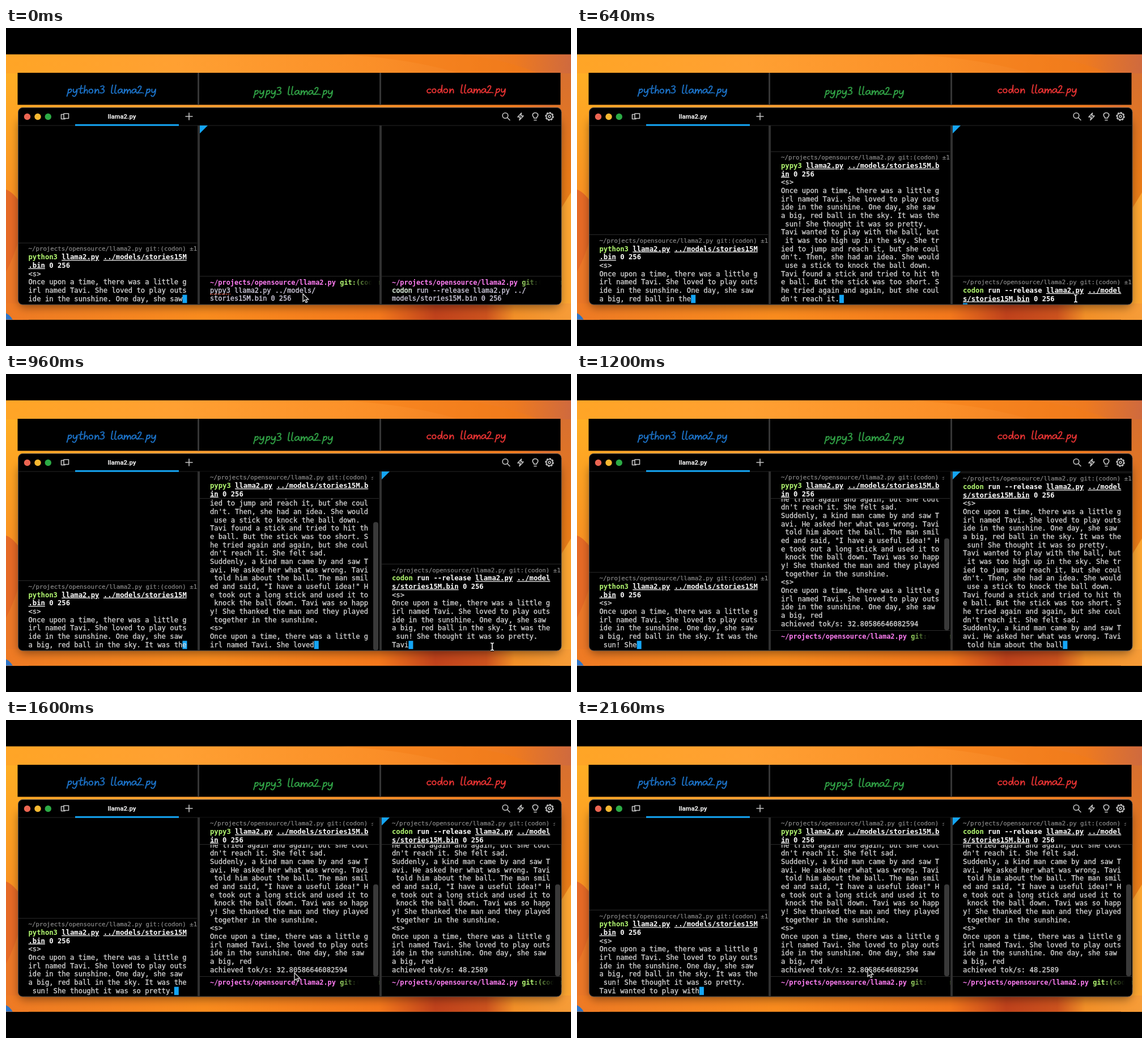
Animation of 997 by 561 pixels, one loop 2240 ms. Source, as an HTML page:

```html
<!DOCTYPE html>
<html lang="en">
<head>
<meta charset="utf-8">
<title>llama2.py speed comparison</title>
<style>
  html, body { margin: 0; width: 100%; height: 100%; overflow: hidden; background: #000; }
  #stage { display: block; width: 100vw; height: 100vh; }
  text { white-space: pre; font-family: "DejaVu Sans Mono", monospace; }
  .out { font-size: 12.21px; fill: #d6d6d6; stroke: #d6d6d6; stroke-width: .3; }
  .cmd { font-size: 12.21px; font-weight: bold; fill: #fff; }
  .name { fill: #b4fa72; }
  .file { text-decoration: underline; }
  .info { font-size: 10.76px; fill: #8c8c8c; stroke: #8c8c8c; stroke-width: .2; }
  .prompt { font-size: 11.9px; font-weight: bold; }
  .edit { font-size: 11.92px; fill: #d8d3e6; stroke: #d8d3e6; stroke-width: .3; }
  .tab { font: bold 11.4px Roboto, sans-serif; fill: #f2f2f2; }
  .hand, .icon { fill: none; stroke-linecap: round; stroke-linejoin: round; }
  .hand { stroke-width: 2; }
  .icon { stroke: #c4c4c4; stroke-width: 1.6; }
</style>
</head>
<body>
<svg id="stage" viewBox="0 0 997 561" preserveAspectRatio="none">
  <defs>
    <linearGradient id="sky">
      <stop offset="0" stop-color="#ffa526"/><stop offset=".3" stop-color="#ffa032"/>
      <stop offset=".65" stop-color="#fb8f28"/><stop offset=".9" stop-color="#ee7a20"/>
      <stop offset="1" stop-color="#cf6a3e"/>
    </linearGradient>
    <linearGradient id="floor">
      <stop offset="0" stop-color="#ee7a24"/><stop offset=".35" stop-color="#fa8c1e"/>
      <stop offset=".66" stop-color="#f4781c"/><stop offset=".76" stop-color="#c0421c"/>
      <stop offset=".85" stop-color="#cc521e"/><stop offset=".9" stop-color="#f29028"/>
      <stop offset="1" stop-color="#f69c38"/>
    </linearGradient>
    <linearGradient id="west" x2="0" y2="1">
      <stop offset="0" stop-color="#ffae24"/><stop offset=".5" stop-color="#f99222"/>
      <stop offset="1" stop-color="#f08a24"/>
    </linearGradient>
    <linearGradient id="east" x2="0" y2="1">
      <stop offset="0" stop-color="#d87030"/><stop offset=".4" stop-color="#e87a18"/>
      <stop offset="1" stop-color="#f08a1c"/>
    </linearGradient>
    <linearGradient id="fade">
      <stop offset="0" stop-opacity="0"/><stop offset=".47"/>
    </linearGradient>
    <filter id="blur" x="-10%" y="-10%" width="120%" height="120%"><feGaussianBlur stdDeviation="8"/></filter>
    <clipPath id="desk"><rect y="46.5" width="997" height="468"/></clipPath>
  </defs>
  <rect width="997" height="561"/>
  <g clip-path="url(#desk)">
    <rect y="46" width="997" height="470" fill="url(#sky)"/>
    <path d="M590 46Q720 55 800 80H940Q880 55 800 46Z" fill="#f27c14" opacity=".4"/>
    <rect y="80" width="40" height="435" fill="url(#west)"/>
    <path d="M0 285Q16 290 40 330V515H0Z" fill="#e56a26"/>
    <path d="M0 430Q16 400 30 350V515H0Z" fill="#f08028" opacity=".6"/>
    <rect x="960" y="80" width="37" height="435" fill="url(#east)"/>
    <path d="M960 350L997 290V515H960Z" fill="#fba532"/>
    <rect y="486" width="997" height="30" fill="url(#floor)"/>
    <path d="M0 503Q8 507 12 515H0Z" fill="#2f74c4"/>
    <rect x="22" y="160" width="957" height="333" rx="12" opacity=".4" filter="url(#blur)"/>
  </g>
  <rect x="20.500" y="79" width="958" height="56.500"/>
  <path d="M339.500 79V135.500M660.500 79V135.500" stroke="#353535" stroke-width="3"/>
  <g id="titles"></g>
  <rect x="21.500" y="140.500" width="958.500" height="347.500" rx="8" stroke="#4a4a4a"/>
  <path d="M22 172H980" stroke="#242424"/>
  <circle cx="37.500" cy="156.500" r="5.700" fill="#ec6552"/>
  <circle cx="56" cy="156.500" r="5.700" fill="#f6b831"/>
  <circle cx="74.300" cy="156.500" r="5.700" fill="#2cab45"/>
  <g class="icon">
    <path d="M101 152.500H97.500V160.500H104M102 151H110.500V159.500H102Z"/>
    <path d="M317 156H329M323 150V162"/>
    <circle cx="881" cy="154.500" r="4.800"/><path d="M884.500 158L889 162.500"/>
    <path d="M909.500 150L903 157H907.500L906 162.500L913 155H908.500Z"/>
    <path d="M931.500 159V157.500Q928.500 155 929.500 152Q931 149.500 934 149.500T938.500 152Q939.500 155 936.500 157.500V159ZM932 162.500H936"/>
    <circle cx="959" cy="156" r="2"/>
    <circle cx="959" cy="156" r="5.600"/>
    <circle cx="959" cy="156" r="6.900" stroke-dasharray="2.2 3.22"/>
  </g>
  <text class="tab" x="204.500" y="160" text-anchor="middle">llama2.py</text>
  <rect x="122" y="169.700" width="183" height="3" fill="#14a5f5"/>
  <path d="M340 172V487M661 172V487" stroke="#303030" stroke-width="4"/>
  <g id="panes"></g>
  <g id="mouse"></g>
</svg>
<script>
const LOOP = 2240, STEP = 80, COLS = 38, CHAR = 7.35, LINE = 14.65;
const TOP = 172, BOTTOM = 487.5, BLUE = '#14a5f5';
const PATH = '~/projects/opensource/llama2.py';

const opening = 'Once upon a time, there was a little girl named Tavi. She loved to play outside in the sunshine. One day, she saw a big, red';
const story = opening + ` ball in the sky. It was the sun! She thought it was so pretty.
Tavi wanted to play with the ball, but it was too high up in the sky. She tried to jump and reach it, but she couldn't. Then, she had an idea. She would use a stick to knock the ball down.
Tavi found a stick and tried to hit the ball. But the stick was too short. She tried again and again, but she couldn't reach it. She felt sad.
Suddenly, a kind man came by and saw Tavi. He asked her what was wrong. Tavi told him about the ball. The man smiled and said, "I have a useful idea!" He took out a long stick and used it to knock the ball down. Tavi was so happy! She thanked the man and they played together in the sunshine.
<s>
` + opening;

// typed: [time, characters printed so far]
const panes = [
  { left: 22, right: 337.5, x: 39.5, command: 'python3 llama2.py ../models/stories15M.bin 0 256',
    start: 0, done: Infinity,
    typed: [[0, 113], [320, 120], [640, 136], [960, 152], [1200, 161], [1600, 187], [2160, 212]] },
  { left: 342, right: 658.5, x: 360, command: 'pypy3 llama2.py ../models/stories15M.bin 0 256',
    draft: ['pypy3 llama2.py ../models/', 'stories15M.bin 0 256'], misspelt: true,
    start: 160, done: 1040, speed: '32.80586646082594', fades: [285, 262],
    typed: [[240, 0], [320, 96], [640, 505], [960, 880], [1040, 941]] },
  { left: 663, right: 979.5, x: 681, command: 'codon run --release llama2.py ../models/stories15M.bin 0 256',
    draft: ['codon run --release llama2.py ../', 'models/stories15M.bin 0 256'],
    start: 640, done: 1440, speed: '48.2589', fades: [262, 285],
    typed: [[850, 0], [960, 192], [1200, 620], [1380, 941]] }
];

// Pen strokes for the handwritten titles: advance width, path
const pen = {
  p: [10, 'M3-8Q2 0 0 6M2.5-5Q6-10 8-7Q9-2 2.5-.5'],
  y: [10.5, 'M1.5-8Q0-1 4-1.5Q7-3 8-8Q8 2 4 6Q1 7 0 4'],
  t: [8.5, 'M5-15Q3-5 3-1Q4 1 7-1M0-8.5L8-9.5'],
  h: [9.5, 'M3-15Q2-6 1 0Q3-7 6-7Q7.5-6 7 0'],
  o: [10, 'M5-8Q0-8 .5-3Q2 1 6-1Q9-5 5-8'],
  n: [10, 'M1.5-8L1 0Q3-7 6-7.5Q8-6 7.5 0'],
  3: [9, 'M1-13Q7-16 7-12Q6-9 3-8Q8-8 7-3Q5 1 0-1'],
  l: [6, 'M3-16Q1-6 1-1Q2 1 4 0'],
  a: [10.5, 'M8-7Q4-10 1-5Q0 0 3-.5Q6-1 8-7Q7-1 10 0'],
  m: [14, 'M1.5-8L1 0Q3-7 5.5-7.5Q7-6 6.5 0Q8-7 11-7.5Q13-5 12 0'],
  2: [9, 'M1-11Q4-16 6.5-13Q7-9 0-.5L8-1'],
  c: [9, 'M7-7Q2-9 .5-4Q1 2 7-1'],
  d: [10.5, 'M7-6Q2-9 .5-4Q1 1 4-.5Q7-3 8-15Q7-4 8.5 0'],
  '.': [5, 'M1-.5L1.3-.3'],
  ' ': [10, '']
};

const byId = id => document.getElementById(id);
const escape = s => s.replace(/&/g, '&amp;').replace(/</g, '&lt;');
const label = (x, y, s, cls, extra = '') => `<text x="${x}" y="${y}" class="${cls}" ${extra}>${escape(s)}</text>`;
const box = (x, y, w, h, fill, extra = '') => `<rect x="${x}" y="${y}" width="${w}" height="${h}" fill="${fill}" ${extra}/>`;
const rule = (p, y) => box(p.left, y, p.right - p.left, 1, '#2b2b2b');
const wrap = s => s.split('\n').flatMap(line => line.match(new RegExp(`.{1,${COLS}}`, 'g')) || ['']);

function track(keys, t) {
  if (t <= keys[0][0]) return keys[0].slice(1);
  const i = keys.findIndex(k => k[0] > t);
  if (i < 0) return keys[keys.length - 1].slice(1);
  const a = keys[i - 1], b = keys[i], u = (t - a[0]) / (b[0] - a[0]);
  return a.slice(1).map((v, j) => v + (b[j + 1] - v) * u);
}

function handwriting(s, x, y, color) {
  const glyphs = [...s].map(ch => {
    const [advance, d] = pen[ch], glyph = `<path d="${d}" transform="translate(${x} ${y}) scale(1 .9)"/>`;
    x += advance;
    return glyph;
  });
  return `<g class="hand" stroke="${color}" role="img" aria-label="${s}">${glyphs.join('')}</g>`;
}

// Whole words only, as the model prints token by token
function printed(count) {
  const head = story.slice(0, count);
  return (/\w/.test(story[count] || '') ? head.replace(/\w+$/, '') : head).trimEnd();
}

function commandRows(p, y) {
  let pos = 0, svg = '';
  p.command.split(' ').forEach((word, i) => {
    const cls = 'cmd' + (i ? '' : ' name') + (word.includes('.') ? ' file' : '');
    for (let k = 0; k < word.length;) {
      const col = pos % COLS, part = word.slice(k, k + COLS - col);
      svg += label(p.x + col * CHAR, y + Math.floor(pos / COLS) * LINE, part, cls);
      k += part.length;
      pos += part.length;
    }
    pos++;
  });
  return svg;
}

function prompt(p, y, fade) {
  return rule(p, y - 15) +
    label(p.x, y, PATH, 'prompt', 'fill="#ff7df3"') +
    label(p.x + 32 * 7.165, y, 'git:(codon)', 'prompt', 'fill="#b4fa72"') +
    box(p.x + fade - 35, y - 12, 75, 17, 'url(#fade)');
}

function draft(p) {
  let svg = prompt(p, 452.5, p.fades[0]);
  p.draft.forEach((s, i) => svg += label(p.x, 466.5 + i * 14.5, s, 'edit'));
  if (p.misspelt) svg += `<path d="M${p.x} 469.5h36" stroke="#e0503c" stroke-width="1.5" stroke-dasharray="2 1.5"/>`;
  else svg += label(p.x, 466.5, p.draft[0].split(' ')[0], 'edit', 'style="fill:#c3efb0"');
  return svg;
}

function block(p, t) {
  const done = t >= p.done;
  const count = Math.round(track(p.typed, t)[0]);
  const text = done ? `${story}\nachieved tok/s: ${p.speed}` : printed(count);
  const lines = text ? wrap('<s>\n' + text) : [];
  const rows = lines.length + 2, last = done ? 444.5 : 481.5;
  const natural = last - (rows - 1) * LINE, pinned = natural < 201;
  const y = pinned ? 201 : natural;
  let svg = '';
  if (!done) {
    const tail = text ? lines[lines.length - 1].length : 0;
    svg += box(p.x + Math.min(tail, COLS - 1) * CHAR, last - 10.8 + (text ? 0 : LINE), 8, 14.5, BLUE);
  }
  lines.forEach((line, i) => {
    const lineY = natural + (i + 2) * LINE;
    if (lineY > 205) svg += label(p.x, lineY, line, 'out');
  });
  if (pinned) svg += box(p.left, TOP, p.right - p.left, 47, '#000') + rule(p, 219);
  else svg += rule(p, y - 29.5);
  svg += label(p.x, y - 14.8, PATH + ' git:(codon) ±1', 'info') + commandRows(p, y);
  if (pinned) {
    const floor = done ? 452 : BOTTOM, view = floor - TOP;
    const thumb = view * view / (rows * LINE + 30);
    svg += box(p.right - 11, TOP, 11, 46, '#000') +
      box(p.right - 10.5, floor - thumb, 9, thumb, '#393939', 'rx="4"');
  }
  return done ? svg + prompt(p, 467, p.fades[1]) : svg;
}

function pane(p, t, focused) {
  const w = p.right - p.left, h = BOTTOM - TOP;
  return `<svg x="${p.left}" y="${TOP}" width="${w}" height="${h}" viewBox="${p.left} ${TOP} ${w} ${h}">` +
    (t < p.start ? draft(p) : block(p, t)) +
    (focused ? `<path d="M${p.left - 1} ${TOP}h15l-15 15z" fill="${BLUE}"/>` : '') + '</svg>';
}

const pointer = [[0, 524, 469], [80, 524, 469], [320, 742, 468], [640, 880, 477], [960, 858, 481],
  [1200, 850, 480], [1600, 509, 446], [2160, 513, 439]];

function mouse(t) {
  if (t > 1040 && t < 1440) return '';
  const [x, y] = track(pointer, t);
  const beam = 'M-3-6.5Q0-6.5 0-4.5Q0-6.5 3-6.5M0-5V5M-3 6.5Q0 6.5 0 4.5Q0 6.5 3 6.5';
  const shape = t >= 240 && t <= 1040
    ? `<path d="${beam}" fill="none" stroke="#000" stroke-width="4"/><path d="${beam}" fill="none" stroke="#eee" stroke-width="1.7"/>`
    : '<path d="M0 0V13.5L3.2 10.7L5.3 15.5L7.7 14.5L5.6 9.8H9.8Z" fill="#050505" stroke="#e6e6e6" stroke-width="1.3"/>';
  return `<g transform="translate(${x} ${y})">${shape}</g>`;
}

function draw(t) {
  const focus = t < 400 ? 1 : 2;
  byId('panes').innerHTML = panes.map((p, i) => pane(p, t, i === focus)).join('');
  byId('mouse').innerHTML = mouse(t);
}

byId('titles').innerHTML =
  handwriting('python3 llama2.py', 107.5, 115, '#1b70c4') +
  handwriting('pypy3 llama2.py', 437, 117.5, '#2f9e44') +
  handwriting('codon llama2.py', 742.5, 114.5, '#e03131');

let shown = -1;
const began = performance.now();
function tick() {
  const t = Math.floor((performance.now() - began) % LOOP / STEP) * STEP;
  if (t !== shown) draw(shown = t);
  requestAnimationFrame(tick);
}
tick();
</script>
</body>
</html>
```
